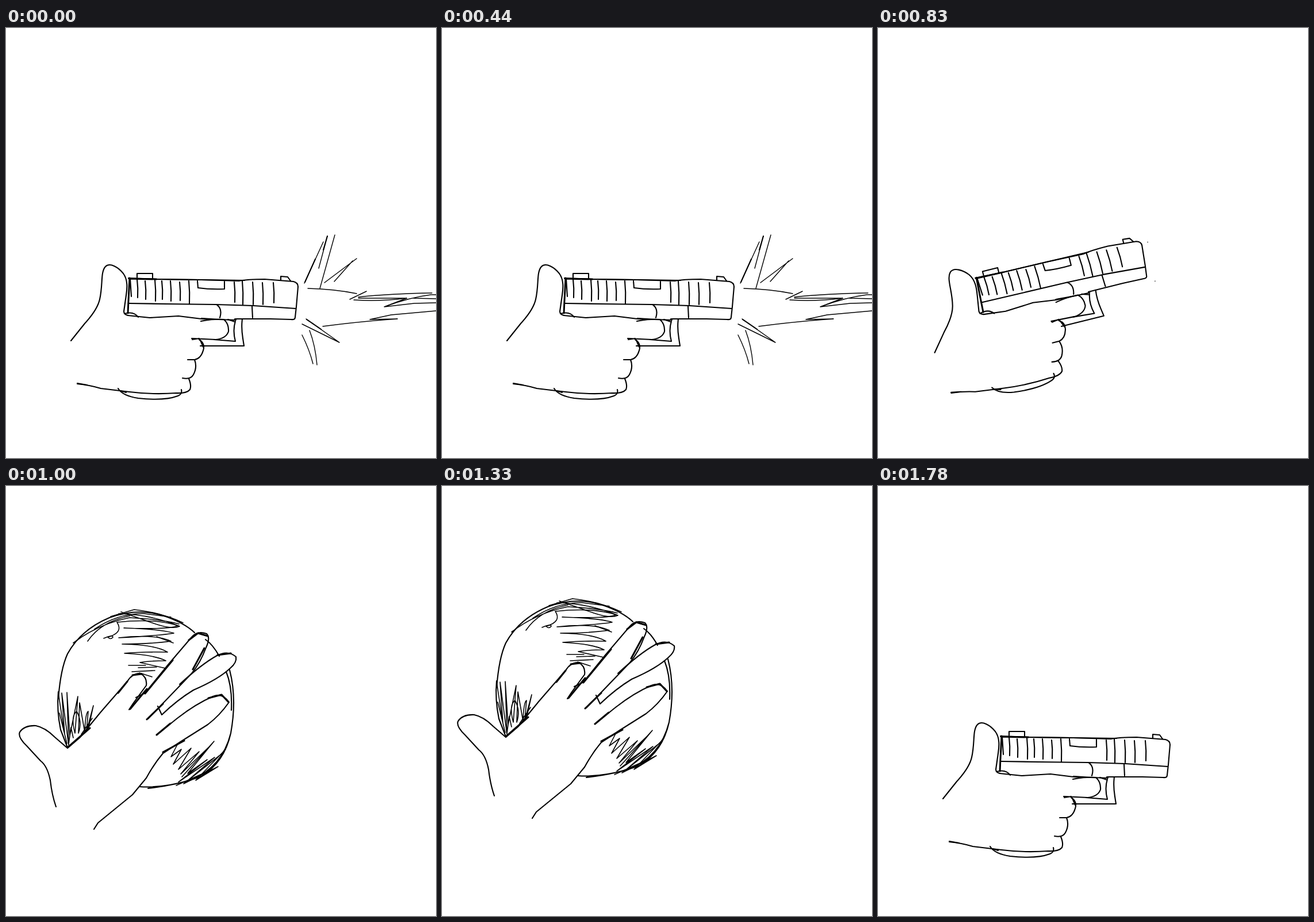
An HTML page for the animation above (2.38 s loop, 748x748 px).

```html
<!DOCTYPE html>
<html lang="en">
<head>
<meta charset="utf-8">
<title>Sketch loop</title>
<style>
  html, body { margin: 0; width: 100%; height: 100%; overflow: hidden; background: #fff; }
  svg { display: block; width: 100vw; height: 100vh; }
  path { fill: none; stroke: #000; stroke-width: 2.1; stroke-linecap: round; stroke-linejoin: round; }
  .thin path { stroke-width: 1.4; }
  path.bold { stroke-width: 3; }
  path.hair { stroke-width: 1.6; }
  [hidden] { display: none; }
</style>
</head>
<body>
<svg viewBox="0 0 748 748">
  <g id="gun">
    <!-- hand -->
    <path d="M113 544L137 514Q159 490 163 472C169 446 164 425 173 415C181 407 196 417 204 427C212 438 211 452 209 465L205 493Q205 498 212 500"/>
    <path d="M339 510Q358 506 379 507Q388 515 387 528Q383 540 365 542L323 540M324 542L336 540"/>
    <path d="M336 542Q347 549 343 561Q339 575 328 577L316 577M328 577Q333 590 326 603Q321 612 307 609M318 610Q323 622 320 629Q314 636 296 635Q255 638 215 633L165 627Q145 621 124 619"/>
    <path d="M195 627Q203 640 230 644Q275 649 299 640Q307 637 305 629"/>
    <path d="M338 543L343 555M124 618L141 621M199 631L209 634"/>
    <!-- slide and frame -->
    <path class="bold" d="M215 435L213 474L212 496M214 436L262 437"/>
    <path d="M216 436L218 467M206 497Q222 492 230 503"/>
    <path d="M213 435L262 437L340 438L405 440Q420 437 450 437L500 441Q508 443 508 450L505 485L503 503Q503 508 496 507L460 506L398 506"/>
    <path d="M212 500L250 504L300 501L340 506L400 508M263 437L415 439M340 505L372 507"/>
    <path d="M214 479L280 480L365 481L430 483L504 488M366 481Q377 488 372 504M428 484L429 504"/>
    <path d="M333 440L334 452Q355 455 380 454L380 441M228 434L228 427L255 427L255 436M478 439L478 432L490 433L495 440"/>
    <path d="M399 510Q394 526 399 545L362 542M411 506Q409 522 412 540L414 553L338 553M386 507L398 511"/>
    <g id="ridges"></g>
    <path id="specks" d="M519 447h.1M515 516h.1" style="stroke-width:1.5"/>
  </g>

  <g id="flash" class="thin">
    <path d="M519 444L552 372M559 362L544 418M572 360L546 453M554 443L610 401M571 441L603 405"/>
    <path style="stroke-width:2" d="M520 442L538 402M559 362L552 386"/>
    <path d="M525 453Q570 454 610 462M598 472L627 458M613 468Q670 462 741 461M605 473Q650 476 697 470L613 470"/>
    <path d="M748 464L739 464Q700 469 658 485L710 479L748 478M697 470L658 485M709 470L748 471"/>
    <path d="M748 492L670 499L633 507L681 506Q620 510 551 519"/>
    <path d="M515 515L580 547L522 506M515 534Q528 560 534 584M528 526Q538 552 541 586"/>
    <path style="stroke-width:2" d="M523 507L548 524"/>
  </g>

  <g id="head" hidden>
    <!-- outline -->
    <path d="M91 370Q95 318 107 292Q130 250 180 229Q230 211 275 226Q310 238 328 255M347 267Q360 276 371 296"/>
    <path d="M389 320Q402 370 391 430Q376 490 320 512Q270 526 232 523M383 323Q394 350 392 390M391 430Q380 480 340 505Q300 520 247 526"/>
    <path d="M91 358Q88 390 95 424L107 455"/>
    <!-- hair -->
    <path class="hair" d="M117 273Q160 240 215 229Q270 232 301 240M142 270Q165 236 215 226M182 227L223 215Q270 220 308 238M196 222Q250 223 302 244Q290 250 260 240L200 219M154 249Q195 221 240 222L287 228"/>
    <path class="hair" d="M170 265Q186 258 186 263Q182 268 177 263Q205 255 193 237Q260 230 299 243Q285 250 205 247Q270 249 292 256Q270 260 196 264Q260 257 287 270Q250 275 202 275Q260 276 281 289Q240 288 206 291Q260 294 278 304Q250 304 233 307L277 317"/>
    <path class="hair" d="M213 312L243 312M230 316L262 315M219 323L259 321M232 325L254 332M262 262L291 273"/>
    <path class="hair" d="M91 360L102 432L97 360L109 451L106 359L111 434Q118 400 125 366L120 430Q112 400 123 392Q133 410 126 430L128 377L137 428Q138 395 143 392L140 427L152 382L143 423M93 395L106 448M109 449L113 420L117 438M131 432L150 404"/>
    <path class="hair" d="M299 448L287 471L305 458L291 484L322 456L300 493L336 462L304 501L355 452L306 506L362 444L316 500L350 476L300 515L363 472L313 515L375 466L309 518L369 488L330 512L382 458M296 521L356 494"/>
    <!-- hand -->
    <path d="M87 558Q80 538 77 512Q72 487 60 478L36 452Q20 437 24 428Q32 416 52 417Q68 420 85 437L107 456L128 438L165 393L211 340Q220 325 234 326Q246 333 244 347L222 377L214 389"/>
    <path d="M226 368L242 360L281 312L322 264Q332 251 349 257Q356 264 348 281Q338 308 323 326L247 405"/>
    <path d="M302 345Q340 310 367 295Q386 285 400 297Q402 307 390 317Q370 336 326 355Q298 372 271 398L264 383"/>
    <path d="M262 433L298 404Q330 379 360 366Q376 359 388 376Q372 399 351 415L305 444L273 465Q257 484 244 508L220 537L160 586L153 597"/>
    <path class="bold" d="M216 388L245 353M242 361L290 303M318 268L334 256L351 261M245 406L273 379M262 433L286 413M352 369L375 363L387 376M273 463L310 443M107 455L146 421M195 360L211 340M220 329L236 327M368 294L391 291M345 282L325 319"/>
  </g>
</svg>
<script>
const LOOP = 2380, FPS = 18, LAST = 32;
const $ = id => document.getElementById(id);
const gun = $('gun'), flash = $('flash'), head = $('head'), specks = $('specks');

// x, top, bottom of each slide ridge
$('ridges').innerHTML = [
  [228, 437, 469], [242, 440, 472], [259, 438, 475], [271, 440, 472],
  [286, 440, 475], [302, 442, 474], [318, 440, 480], [397, 442, 477],
  [411, 440, 481], [429, 442, 481], [446, 443, 481], [465, 443, 478]
].map(([x, a, b]) => `<path d="M${x} ${a}Q${x + 2} ${(a + b) / 2} ${x + 1} ${b}"/>`).join('');

// kick after each shot: dx, dy, degrees
const kick = [[0, 0, 0], [-20, 6, -20], [-34, -45, -36], [-14, -8, -14]];

const show = (el, on) => on ? el.removeAttribute('hidden') : el.setAttribute('hidden', '');
const place = (el, [x, y, deg], cx, cy) =>
  el.setAttribute('transform', `translate(${x} ${y}) rotate(${deg} ${cx} ${cy})`);

function stepAt(t) {
  let i = 0;
  while (i < LAST && t >= 10 * Math.round((i + 1) * 100 / FPS)) i++;
  return i;
}

function draw(i) {
  const shooting = i < 16, rising = i >= 26;
  show(gun, shooting || rising);
  show(head, !shooting && !rising);
  show(flash, shooting && i % 4 === 0);
  show(specks, i < LAST && !(shooting && i % 4 === 0));
  if (shooting) {
    place(gun, kick[i % 4], 230, 560);
  } else if (rising) {
    const left = Math.max(0, 31 - i);
    place(gun, [8.6 * left, 29.3 * left, 0.23 * left], 200, 520);
  } else {
    const lift = Math.sin((i - 18) * Math.PI / 4) ** 2;
    place(head, [4 * lift, -19 * lift, 0], 0, 0);
  }
}

const begin = performance.now();
function tick() {
  draw(stepAt((performance.now() - begin) % LOOP));
  requestAnimationFrame(tick);
}
tick();
</script>
</body>
</html>
```
